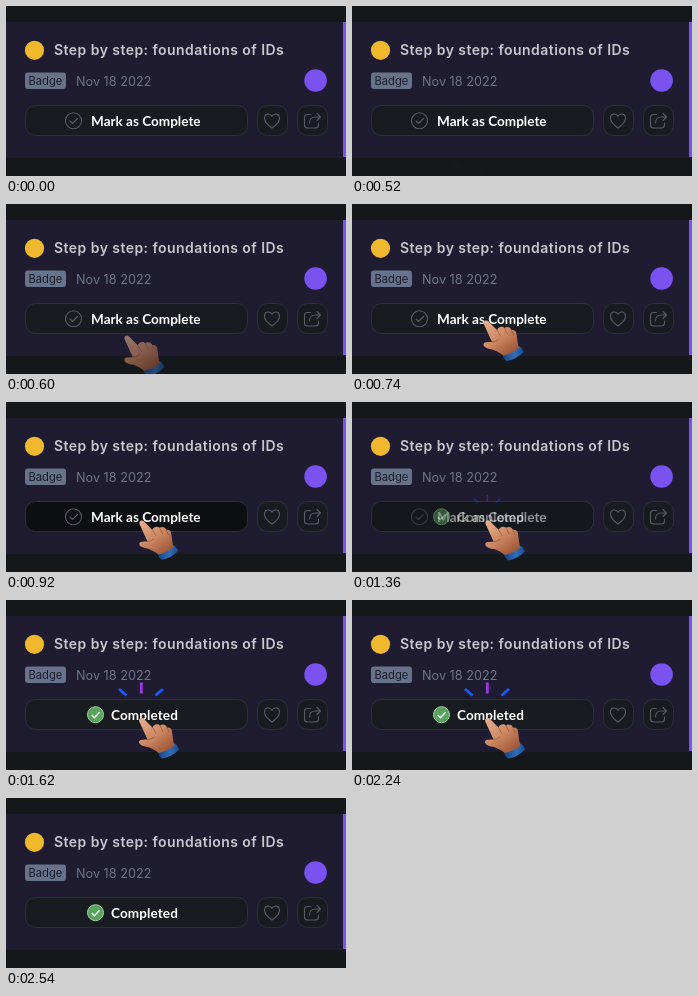
An HTML page for the animation above (3920 ms loop, 340 px wide and 170 px high).

```html
<!DOCTYPE html>
<html lang="en">
<head>
<meta charset="utf-8">
<title>Badge task</title>
<style>
html, body { margin: 0; width: 100%; height: 100%; overflow: hidden; background: #14181b; }
svg { display: block; width: 340px; height: 170px; font-family: Inter, sans-serif; }
.label { font: 700 13.55px Lato, sans-serif; fill: #fff; }
.box { fill: #181b20; stroke: #2d3037; }
.icon { fill: none; stroke: #585c64; stroke-width: 1.1; stroke-linecap: round; stroke-linejoin: round; }
.crease { fill: none; stroke: #8a4528; stroke-width: .8; stroke-linecap: round; opacity: .7; }
</style>
</head>
<body>
<svg viewBox="0 0 340 170">
  <defs>
    <linearGradient id="skin" x1="0" y1="0" x2=".8" y2="1">
      <stop offset="0" stop-color="#e9b193"/>
      <stop offset=".5" stop-color="#cf8a65"/>
      <stop offset="1" stop-color="#9a5334"/>
    </linearGradient>
    <linearGradient id="sleeve">
      <stop offset="0" stop-color="#17407f"/>
      <stop offset=".6" stop-color="#2f6fba"/>
      <stop offset="1" stop-color="#1b4a8c"/>
    </linearGradient>
  </defs>

  <rect y="16" width="340" height="136" fill="#1f1c31"/>
  <rect x="337" y="16" width="3" height="135" fill="#7952ef"/>
  <circle cx="28.500" cy="44.300" r="9.600" fill="#f0b92d"/>
  <text x="48" y="49" font-size="14" font-weight="600" letter-spacing=".45" fill="#c8c7cc">Step by step: foundations of IDs</text>

  <rect x="19" y="66.500" width="41" height="16.500" rx="3" fill="#66738b"/>
  <text x="22.500" y="79" font-size="11.200" fill="#1c1d2c">Badge</text>
  <text x="70" y="79.500" font-size="12.700" fill="#6f7588">Nov 18 2022</text>
  <circle cx="309.600" cy="74.500" r="11.300" fill="#7952ef"/>

  <rect class="box" x="19.500" y="99.500" width="222" height="30" rx="10"/>
  <rect id="dark" x="20" y="100" width="221" height="29" rx="9.500" fill="#08090b"/>
  <rect class="box" x="251.500" y="99.500" width="30" height="30" rx="10"/>
  <rect class="box" x="291.500" y="99.500" width="30" height="30" rx="10"/>
  <path class="icon" d="M266 122C261 118.500 258.500 115.500 258.500 112.300C258.500 107.500 264 106.500 266 110.300C268 106.500 273.500 107.500 273.500 112.300C273.500 115.500 271 118.500 266 122Z"/>
  <path class="icon" d="M304.500 108.500h-3q-3 0-3 3v7.500q0 3 3 3h8q3 0 3-3v-2M303.500 117q0-6 6-6h4M311 107.500l3.500 3.500-3.500 3.500"/>

  <g id="todo">
    <circle class="icon" cx="67.500" cy="114.700" r="8"/>
    <path class="icon" d="M64 115l2.500 2.500 5-5"/>
    <text class="label" x="85" y="120">Mark as Complete</text>
  </g>
  <g id="done">
    <circle cx="89.500" cy="114.700" r="8" fill="#57a45b" stroke="#a3cba3"/>
    <path d="M85.800 115l2.700 2.700 5-5.400" fill="none" stroke="#fff" stroke-width="1.600"/>
    <text class="label" x="105" y="120" letter-spacing=".1">Completed</text>
  </g>

  <g id="sparks" fill="none" stroke-width="2.800">
    <path d="M120.500 95.500L113 89M149.500 95.500L157 89" stroke="#1d59f5"/>
    <path d="M135.300 93.500V82.500" stroke="#9b35e5"/>
  </g>

  <g id="hand">
    <path d="M151.500 151L168 143.500Q171 144 173 149.500Q166 157 156 158.500Q152.500 156 151.500 151Z" fill="url(#sleeve)"/>
    <path d="M133.500 122C132 118.500 135.500 116.500 138 119L146.500 127.500C148 124 152 123.500 154 125.500C157 123.500 160 125 161 127.500C164 127 166 129 166 131.500C167 137 167 141 168.500 145.500Q162 151 153 153C149 150 145 148 142 147C138 146.500 133 145 133 142C133 139.500 137 139.500 141.500 139.500Z" fill="url(#skin)"/>
    <path class="crease" d="M146.500 127.500l3.500 6M154 125.500l3 6M161 127.500l2 5M141.500 139.500q4 0 6.500-2.500"/>
  </g>
</svg>
<script>
const $ = id => document.getElementById(id);
const span = (t, a, b) => Math.min(1, Math.max(0, (t - a) / (b - a)));
const smooth = x => x * x * (3 - 2 * x);
const fade = (id, v) => $(id).setAttribute("opacity", v);

function draw(t) {
  const away = (1 - span(t, 520, 740)) ** 2;  // share of the approach still left
  const down = smooth(span(t, 760, 1040));
  const press = down * (1 - smooth(span(t, 1140, 1460)));
  const swap = smooth(span(t, 1140, 1600));
  const burst = smooth(span(t, 1200, 1620));
  const leave = 1 - smooth(span(t, 2240, 2540));

  fade("dark", press);
  fade("todo", 1 - swap);
  fade("done", swap);

  fade("sparks", burst * leave);
  const grow = .4 + .6 * burst;
  $("sparks").setAttribute("transform",
    `translate(135.3 108) scale(${grow}) translate(-135.3 -108)`);

  fade("hand", (1 - away) * leave);
  const lift = 1.5 * (1 - down);
  $("hand").setAttribute("transform",
    `translate(${-33 * away - lift} ${38 * away - lift}) ` +
    `translate(160 155) scale(${1 - .05 * press}) translate(-160 -155)`);
}

const start = performance.now();
function tick() {
  draw((performance.now() - start) % 3920);
  requestAnimationFrame(tick);
}
tick();
</script>
</body>
</html>
```
